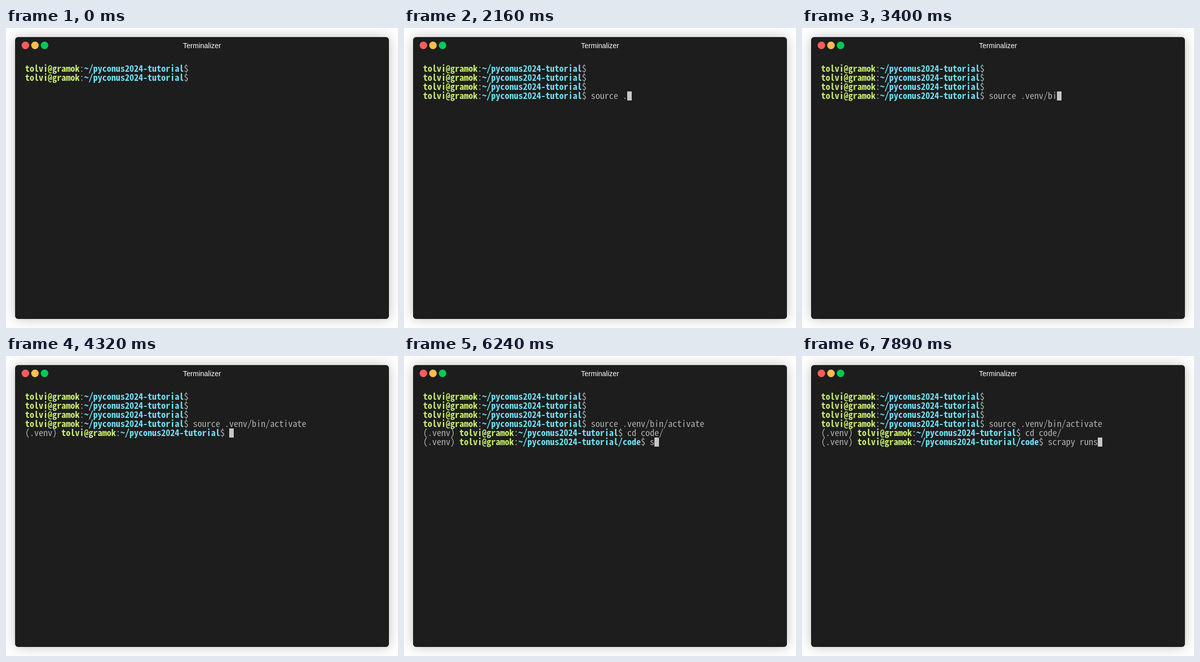
Animation of 778 by 596 pixels, one loop 8000 ms. Source, as an HTML page:

```html
<!DOCTYPE html>
<html lang="en">
<head>
<meta charset="utf-8">
<title>Terminal session</title>
<style>
  html, body { margin: 0; width: 100%; height: 100%; overflow: hidden; background: #fff; }
  .window {
    position: absolute; left: 18px; top: 18px; width: 742px; height: 560px;
    border-radius: 6px; background: #1d1d1d; box-shadow: 0 0 24px rgba(0, 0, 0, .25);
  }
  .button { position: absolute; top: 9px; width: 15px; height: 15px; border-radius: 50%; }
  .close { left: 13px; background: #ff5c5c; }
  .minimize { left: 32px; background: #ffbd4c; }
  .zoom { left: 51px; background: #00ca56; }
  .title {
    position: absolute; top: 8px; width: 100%; text-align: center; color: #fff;
    font: 14px/18px "Liberation Sans", Arial, sans-serif;
  }
  #screen {
    position: absolute; left: 20px; top: 54px; overflow: visible; fill: #afafaf;
    font: 18px "Noto Sans Mono CJK JP", "Noto Sans Mono", monospace; font-variant-ligatures: none;
  }
  text { white-space: pre; }
  .user, .path { font-weight: 700; }
  .user { fill: #c8ed71; }
  .path { fill: #75dff2; }
  .cursor { fill: #c7c7c7; }
</style>
</head>
<body>
<div class="window">
  <i class="button close"></i><i class="button minimize"></i><i class="button zoom"></i>
  <div class="title">Terminalizer</div>
  <svg id="screen" width="702" height="486"></svg>
</div>
<script>
const LOOP = 8000;
const CELL = { width: 9, height: 18, baseline: 15 };
const screen = document.getElementById('screen');

// Choose the font size whose characters are one cell wide.
const pen = document.createElement('canvas').getContext('2d');
pen.font = `100px ${getComputedStyle(screen).fontFamily}`;
screen.style.fontSize = `${100 * CELL.width / pen.measureText('0').width}px`;

const prompt = (dir = '') =>
  `<tspan class="user">tolvi@gramok</tspan>:<tspan class="path">~/pyconus2024-tutorial${dir}</tspan>$`;

// One output event per character, at the given times.
const type = (text, ...times) => times.map((time, i) => [time, text[i]]);

const events = [
  [0, `${prompt()}\n${prompt()}`],
  [20, `\n${prompt()}\n${prompt()} `],
  ...type('sour', 950, 1020, 1100, 1170),
  [1680, 'ce '],
  ...type('.venv/', 2160, 2450, 2540, 2680, 2790, 3000),
  ...type('bin/ac', 3290, 3400, 3440, 3540, 3730, 3870),
  [3970, 'tivate'],
  [4320, `\n(.venv) ${prompt()} `],
  ...type('cd co', 4680, 4770, 4860, 4950, 5040),
  [5180, 'de/'],
  [5710, `\n(.venv) ${prompt('/code')} `],
  ...type('scrapy ', 6240, 6490, 6830, 6900, 6970, 7130, 7310),
  ...type('runs', 7510, 7600, 7690, 7890),
];

function render(output, showCursor) {
  const rows = output.split('\n');
  screen.innerHTML = rows
    .map((row, i) => `<text y="${i * CELL.height + CELL.baseline}">${row}</text>`).join('');
  if (!showCursor) return;
  const x = screen.lastChild.textContent.length * CELL.width;
  const y = (rows.length - 1) * CELL.height;
  screen.innerHTML +=
    `<rect class="cursor" x="${x}" y="${y}" width="${CELL.width}" height="${CELL.height}"/>`;
}

let shown = 0;

function draw() {
  const time = performance.now() % LOOP;
  const past = events.filter(([start]) => start <= time);
  if (past.length !== shown) {
    shown = past.length;
    render(past.map(([, output]) => output).join(''), shown > 1);
  }
  requestAnimationFrame(draw);
}
draw();
</script>
</body>
</html>
```
